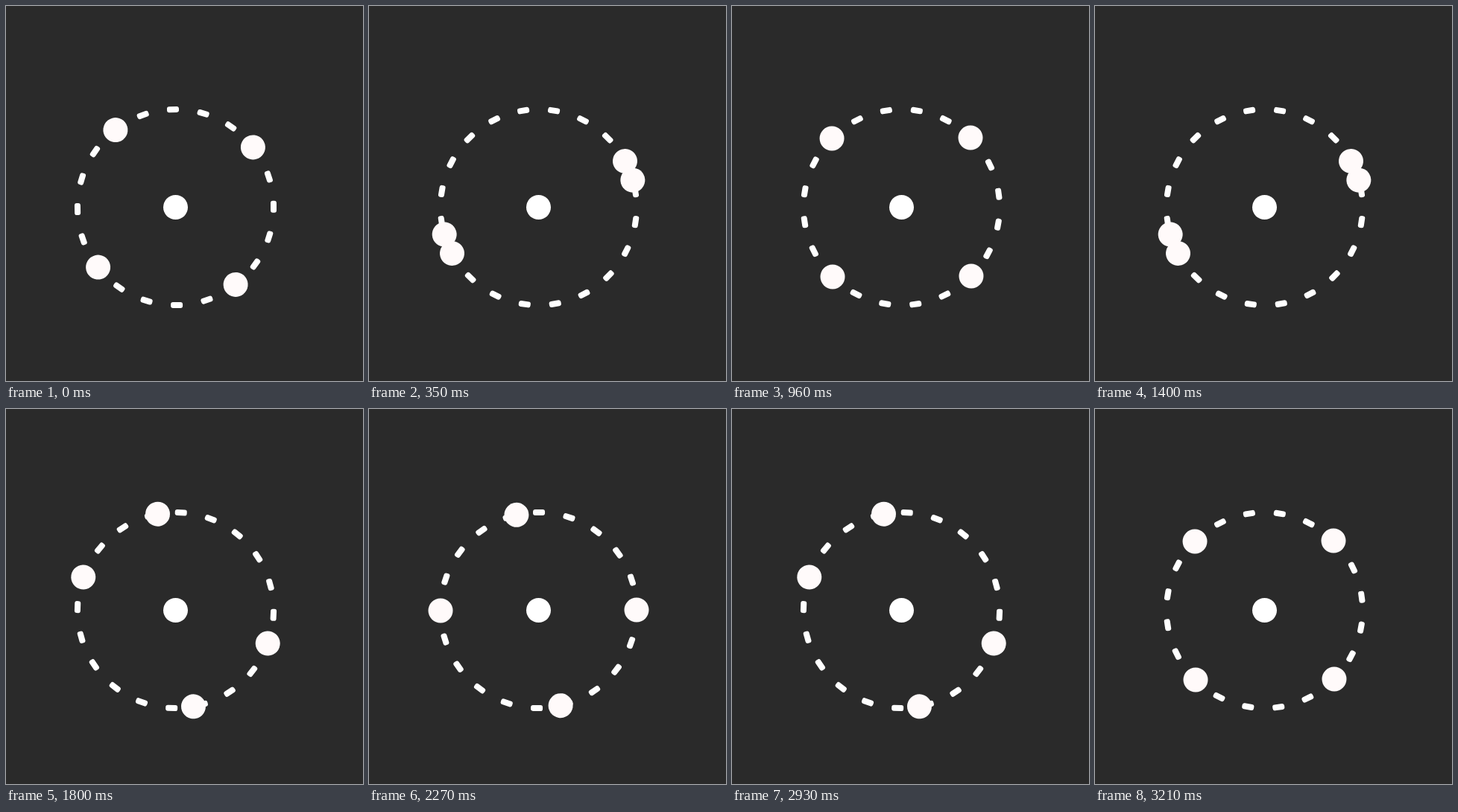
Write an HTML page that moves like this. It is 479 px wide and 504 px high and loops after 3.28 s.

```html
<!DOCTYPE html>
<html lang="en">
<head>
<meta charset="utf-8">
<title>Orbit loader</title>
<style>
  html, body { margin: 0; width: 100%; height: 100%; overflow: hidden; background: #2a2a2a; }
  svg { display: block; }
</style>
</head>
<body>
<svg width="479" height="504" viewBox="0 0 479 504">
  <g transform="translate(227.5 270.5)">
    <g id="ring" fill="#fff"></g>
    <g id="main" fill="#fffafa"></g>
    <g id="cross" fill="#fffafa"></g>
    <circle r="16.5" fill="#fff"/>
  </g>
</svg>
<script>
const RADIUS = 131.5, BALL = 16.5;
const REST = -45.3;                  // angle of the main pair at rest
const DASHES = 20, FIRST = 19.6, PITCH = 17.917;

// One turn in 13 steps: ring angle, and how far the cross pair lags behind it.
const TURN = [0, 45.1, 88, 129, 168, 197.2, 219.6, 228, 235.5, 245.1, 264, 291, 324];
const LAG = [0, 12.8, 31, 50, 67, 78, 87.4, 78, 57, 30.3, 11, 2, 0];
const START = 7.5;                   // the loop opens slightly into the turn

// Tempo: step length in ms for each run of 8 steps.
const TEMPO = [70, 80, 100, 90, 70], RUN = 8;
const LOOP = RUN * TEMPO.reduce((a, b) => a + b);

const [ring, main, cross] = ["ring", "main", "cross"].map(id => document.getElementById(id));

function add(parent, tag, attrs) {
  const el = document.createElementNS("http://www.w3.org/2000/svg", tag);
  for (const key in attrs) el.setAttribute(key, attrs[key]);
  parent.append(el);
}

for (let i = 0; i < DASHES; i++) {
  add(ring, "rect", {
    x: RADIUS - 4, y: -8, width: 8, height: 16, rx: 3,
    transform: `rotate(${FIRST + i * PITCH})`
  });
}
for (const pair of [main, cross]) {
  for (const side of [-1, 1]) add(pair, "circle", { cx: side * RADIUS, r: BALL });
}

function stepAt(ms) {
  let step = 0;
  for (const len of TEMPO) {
    if (ms < len * RUN) return step + Math.floor(ms / len);
    ms -= len * RUN;
    step += RUN;
  }
  return step - 1;
}

function rotate(el, deg) {
  el.setAttribute("transform", `rotate(${deg})`);
}

function draw(ms) {
  const step = stepAt(ms % LOOP);
  const phase = step % TURN.length;
  const angle = REST + (step ? TURN[phase] : START);
  rotate(ring, angle);
  rotate(main, angle);
  rotate(cross, angle + 90 - LAG[phase]);
}

const begin = performance.now();
function tick() {
  draw(performance.now() - begin);
  requestAnimationFrame(tick);
}
tick();
</script>
</body>
</html>
```
